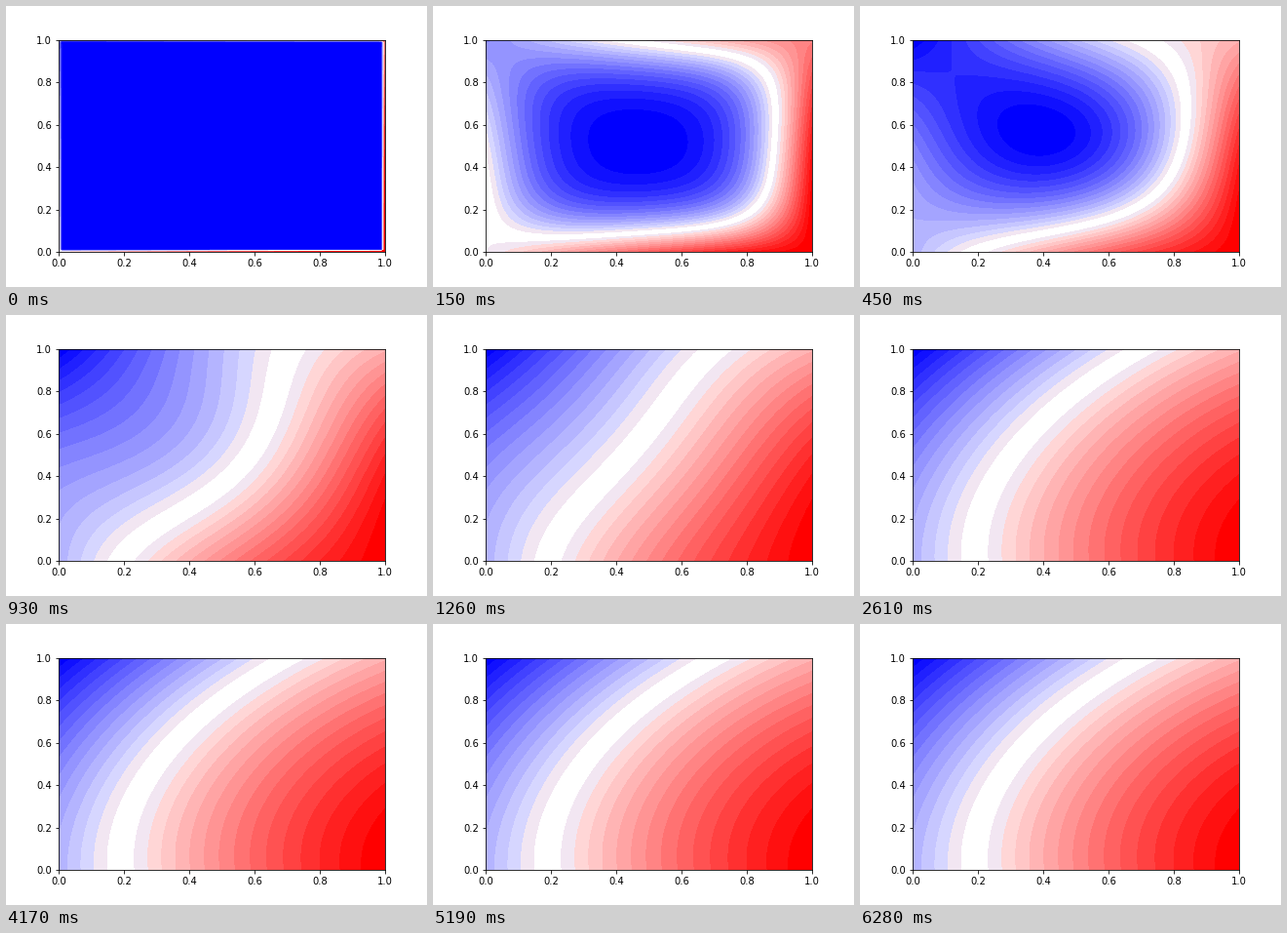
Write a matplotlib script that moves like this. It is 432 px wide and 288 px high and loops after 8.68 s.

```python
import numpy as np
import matplotlib.pyplot as plt
from matplotlib.animation import FuncAnimation

LOOP, TICK, STEP = 8680, 20, 30   # ms
LAST = 181                        # the field is settled from here on
DT = 0.0034                       # diffusion time per step
EXTRA = 0.25                      # source beyond that balancing sin x + cos y
BANDS = 32
N = 100

x = np.linspace(0, 1, N + 1)
X, Y = np.meshgrid(x, x)
edge = np.sin(X) + np.cos(Y)

# Sine modes of the unit square; they vanish on its border.
k = np.arange(1, N)
S = np.sin(np.pi * np.outer(x[1:-1], k))
rate = np.pi ** 2 * (k[:, None] ** 2 + k ** 2)


def to_modes(f):
    return S.T @ f @ S * (2 / N) ** 2


rise = to_modes(np.full((N - 1, N - 1), EXTRA)) / rate
start = -to_modes(edge[1:-1, 1:-1]) - rise


def field(step):
    """Heat spreading in from the fixed border after a number of steps."""
    u = edge.copy()
    u[1:-1, 1:-1] += S @ (rise + start * np.exp(-rate * DT * step)) @ S.T
    return u


def band_colors():
    colors = [plt.cm.bwr(t)[:3] for t in np.linspace(0, 1, BANDS)]
    mid = BANDS // 2
    colors[mid - 1] = colors[mid] = (1, 1, 1)
    colors[mid - 2] = colors[mid + 1] = (0.949, 0.902, 0.949)
    return colors


plt.rcParams["font.family"] = "DejaVu Sans"
fig = plt.figure(figsize=(6, 4), dpi=72, facecolor="white")
ax = fig.add_axes([0.125, 0.125, 0.775, 0.755])
ax.set(xlim=(0, 1), ylim=(0, 1),
       xticks=np.linspace(0, 1, 6), yticks=np.linspace(0, 1, 6))
colors = band_colors()
shown = {"step": None, "bands": None}


def draw(i):
    step = min((i * TICK + TICK // 2) // STEP, LAST)
    if step != shown["step"]:
        if shown["bands"] is not None:
            shown["bands"].remove()
        u = field(step)
        levels = np.linspace(u.min(), u.max(), BANDS + 1)
        shown["bands"] = ax.contourf(X, Y, u, levels=levels, colors=colors)
        shown["step"] = step
    return [shown["bands"]]


anim = FuncAnimation(fig, draw, frames=LOOP // TICK, interval=TICK,
                     init_func=lambda: draw(0), repeat=True, repeat_delay=0)
plt.show()
```
